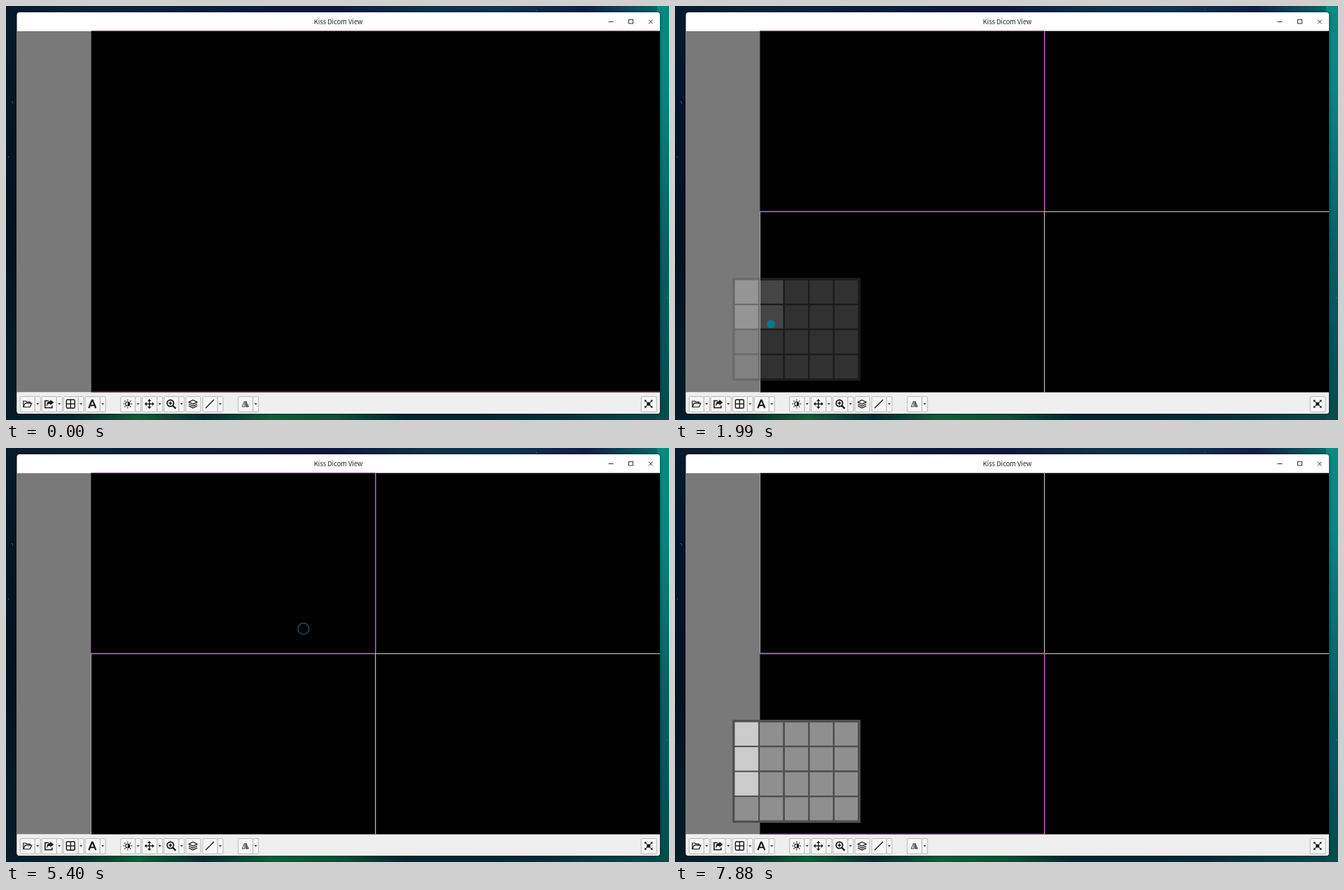
Recreate the animation shown at these times as an HTML page with a canvas. Size 947x591 px, loop 8 s.

```html
<!DOCTYPE html>
<html lang="en">
<head>
<meta charset="utf-8">
<title>Kiss Dicom View</title>
<style>
  html, body { margin: 0; width: 100%; height: 100%; overflow: hidden; background: #061826; }
  canvas { display: block; }
</style>
</head>
<body>
<canvas id="stage" width="947" height="591"></canvas>
<script>
const W = 947, H = 591, LOOP = 8000;
const stage = document.getElementById('stage');
const view = stage.getContext('2d');
const INK = '#161616', TEAL = '#06798d';
const AREA = { l: 121, t: 35, r: 934, b: 551.5 };
const MID = { x: 527, y: 293 };
let g = view;

function rect(x, y, w, h, fill) {
  g.fillStyle = fill;
  g.fillRect(x, y, w, h);
}

function poly(points, close) {
  g.beginPath();
  points.forEach(([x, y], i) => i ? g.lineTo(x, y) : g.moveTo(x, y));
  if (close) g.closePath();
}

function stroke(points, width = 1.3, close = false) {
  poly(points, close);
  g.lineWidth = width;
  g.stroke();
}

function fill(points) {
  poly(points, true);
  g.fill();
}

function circle(x, y, r) {
  g.beginPath();
  g.arc(x, y, r, 0, Math.PI * 2);
}

function strip(x, y, w, h, colors) {
  const grad = w > h ? g.createLinearGradient(x, 0, x + w, 0) : g.createLinearGradient(0, y, 0, y + h);
  colors.forEach((c, i) => grad.addColorStop(i / (colors.length - 1), c));
  rect(x, y, w, h, grad);
}

// Icons are drawn around 0,0
const icons = {
  folder() {
    stroke([[-5.5, 4.5], [-5.5, -4], [-2, -4], [-0.7, -2.6], [4, -2.6], [4, -0.8]], 1.2);
    stroke([[-5.5, 4.5], [-3, -0.8], [6.4, -0.8], [4, 4.5]], 1.2, true);
  },
  share() {
    stroke([[-0.5, -4.5], [-5.5, -4.5], [-5.5, 5.5], [4.5, 5.5], [4.5, 2.5]], 1.6);
    fill([[2, -6], [7, -2], [2, 2], [2, -0.2], [-1, 0.3], [-3.4, 3.4], [-2.6, -1.4], [-0.6, -3.6], [2, -3.9]]);
  },
  grid() {
    g.lineWidth = 1.4;
    g.beginPath();
    g.roundRect(-6, -6, 12, 12, 1.5);
    g.stroke();
    stroke([[0, -6], [0, 6]], 1.4);
    stroke([[-6, 0], [6, 0]], 1.4);
  },
  letter() {
    stroke([[-5, 6], [-0.5, -5.2], [0.5, -5.2], [5, 6]], 2.2);
    stroke([[-3, 2.2], [3, 2.2]], 1.9);
  },
  light() {
    circle(0, 0, 3);
    g.lineWidth = 1.1;
    g.stroke();
    g.beginPath();
    g.arc(0, 0, 3, -Math.PI / 2, Math.PI / 2);
    g.fill();
    for (let i = 0; i < 8; i++) {
      const c = Math.cos(i * Math.PI / 4), s = Math.sin(i * Math.PI / 4);
      stroke([[c * 4.7, s * 4.7], [c * 6.3, s * 6.3]], 1.2);
    }
  },
  move() {
    stroke([[-5, 0], [5, 0]], 1.4);
    stroke([[0, -5], [0, 5]], 1.4);
    turns(0, () => fill([[0, -7], [2.7, -4], [-2.7, -4]]));
  },
  zoom() {
    circle(-1, -1, 4.7);
    g.lineWidth = 1.7;
    g.stroke();
    stroke([[2.6, 2.6], [6.6, 6.6]], 2.2);
    stroke([[-3.4, -1], [1.4, -1]], 1.5);
    stroke([[-1, -3.4], [-1, 1.4]], 1.5);
  },
  layers() {
    stroke([[0, -5.5], [6, -2.6], [0, 0.3], [-6, -2.6]], 1.2, true);
    stroke([[-6, 0.2], [0, 3.1], [6, 0.2]], 1.2);
    stroke([[-6, 2.9], [0, 5.8], [6, 2.9]], 1.2);
  },
  line() {
    stroke([[-6, 6], [6, -6]], 1.3);
  },
  flip() {
    stroke([[-0.9, -4], [-0.9, 4], [-4.6, 4]], 0.8, true);
    g.fillStyle = '#888';
    fill([[0.9, -4], [0.9, 4], [4.6, 4]]);
    stroke([[0.9, -4], [0.9, 4], [4.6, 4]], 0.8, true);
  },
  expand() {
    circle(0, 0, 2.6);
    g.fill();
    turns(Math.PI / 4, () => {
      stroke([[0, -2], [0, -6]], 1);
      fill([[0, -8.3], [2, -5.6], [-2, -5.6]]);
    });
  }
};

function turns(start, draw) {
  for (let i = 0; i < 4; i++) {
    g.save();
    g.rotate(start + i * Math.PI / 2);
    draw();
    g.restore();
  }
}

function box(x, w) {
  g.beginPath();
  g.roundRect(x + 0.5, 557.5, w - 1, 22, 1.5);
  g.fillStyle = '#f6f6f6';
  g.fill();
  g.strokeStyle = '#b9b9b9';
  g.lineWidth = 1;
  g.stroke();
}

function button(x, name, menu = true, w = 22) {
  if (menu) {
    box(x + 21, 9);
    g.fillStyle = '#444';
    fill([[x + 23.4, 567], [x + 27.6, 567], [x + 25.5, 569.4]]);
  }
  box(x, w);
  g.save();
  g.translate(x + w / 2 - 0.4, 568);
  g.fillStyle = g.strokeStyle = INK;
  icons[name]();
  g.restore();
}

function wallpaper() {
  rect(0, 0, W, H, '#061826');
  strip(0, 0, W, 12, ['#071b2d', '#08243a', '#0a1f3c', '#0b1a3d', '#0f173f', '#0b3149', '#0b3553', '#101d48', '#08716d']);
  strip(0, 578, W, 13, ['#041c28', '#06282d', '#096039', '#062b31', '#09603a', '#085336', '#06262f', '#062530', '#062c34', '#073d41', '#084b49']);
  strip(0, 0, 18, H, ['#071b2d', '#04142a', '#031225', '#04111e', '#041925', '#041c28']);
  strip(930, 0, 17, H, ['#0b8a80', '#0a8580', '#097270', '#086062', '#07545a', '#084b49']);
  for (const [x, y] of [[8, 136], [9, 138], [3, 215], [15, 494], [354, 9], [757, 6], [944, 416]]) rect(x, y, 1, 1, '#6d8aa0');
}

function frame() {
  g.save();
  g.shadowColor = 'rgba(0,0,0,.45)';
  g.shadowBlur = 5;
  g.beginPath();
  g.roundRect(15.5, 9, 918.5, 573, 4);
  g.fillStyle = '#fff';
  g.fill();
  g.restore();

  g.fillStyle = '#222';
  g.font = '9.3px "Noto Sans CJK SC", "Noto Sans", sans-serif';
  g.textAlign = 'center';
  g.textBaseline = 'alphabetic';
  g.fillText('Kiss Dicom View', 474.7, 26.2);

  g.strokeStyle = '#333';
  stroke([[860.5, 22.5], [867.5, 22.5]], 1);
  g.strokeRect(889.5, 19.5, 6, 5.5);
  stroke([[918, 19.7], [923.6, 25.3]], 1);
  stroke([[923.6, 19.7], [918, 25.3]], 1);

  rect(15.5, 36, 106, 515.5, '#797979');
  g.beginPath();
  g.roundRect(15.5, 551.5, 918.5, 30.5, [0, 0, 4, 4]);
  g.fillStyle = '#efefef';
  g.fill();

  ['folder', 'share', 'grid', 'letter'].forEach((n, i) => button(19.7 + 31 * i, n));
  ['light', 'move', 'zoom'].forEach((n, i) => button(163.2 + 31 * i, n));
  button(256.5, 'layers', false);
  button(280.5, 'line');
  button(331.2, 'flip');
  button(906.7, 'expand', false, 23);
}

const backdrop = document.createElement('canvas');
backdrop.width = W;
backdrop.height = H;
g = backdrop.getContext('2d');
wallpaper();
frame();
g = view;

// Pane numbers: 0 top left, 1 top right, 2 bottom left, 3 bottom right
const clicks = [
  { down: 1060, up: 1110, x: 93, y: 568 },
  { down: 1940, up: 2010, x: 137, y: 454, pane: 0 },
  { down: 2600, up: 2680, x: 622, y: 236, pane: 1 },
  { down: 3250, up: 3340, x: 612, y: 372, pane: 3 },
  { down: 3860, up: 3930, x: 455, y: 379, pane: 2 },
  { down: 4390, up: 4470, x: 600, y: 240, pane: 1 },
  { down: 4760, up: 4840, x: 606, y: 362, pane: 3 },
  { down: 5110, up: 5210, x: 425, y: 258, pane: 0 },
  { down: 5470, up: 5550, x: 604, y: 360, pane: 3 },
  { down: 5800, up: 5880, x: 598, y: 242, pane: 1 },
  { down: 6130, up: 6355, x: 394, y: 357, pane: 2 },
  { down: 7370, up: 7430, x: 93, y: 568 }
];
const SPLIT = 1940, RING = 360;

function panes(t) {
  const { l, t: top, r, b } = AREA;
  rect(l + 0.5, top + 0.7, r - l - 0.5, b - top - 0.7, '#000');
  if (t < SPLIT) {
    rect(l + 1, 35.6, r - l - 1, 0.9, '#4c0d4c');
    rect(l + 1, 550, r - l - 1, 1, '#571457');
    return;
  }
  const active = clicks.filter(c => c.pane !== undefined && c.down <= t).pop().pane;
  const col = active % 2, row = active >> 1;
  const GREY = '#b6b6b6', PINK = '#b45fba';

  rect(l, 36, 1, MID.y - 36, '#a2a2a2');
  rect(l, MID.y, 1, b - MID.y, '#a2a2a2');
  rect(MID.x, 36, 1.3, b - 36, GREY);
  rect(l, MID.y, r - l, 1.2, GREY);

  const x = col ? MID.x : l, y = row ? MID.y : 36;
  const w = col ? r - MID.x : MID.x - l, h = row ? b - MID.y : MID.y - 36;
  if (!col) rect(l, y, 1, h, '#3a2a3a');
  rect(MID.x, y, 1.3, h, PINK);
  if (row) {
    rect(x, MID.y - 0.4, w, 0.7, '#8fb08f');
    rect(x, MID.y + 0.2, w, 0.9, PINK);
    rect(x, 550, w, 1, '#571457');
  } else {
    rect(x, MID.y - 0.3, w, 1, PINK);
    rect(x, 35.6, w, 0.9, '#4c0d4c');
  }
}

const clamp = v => Math.max(0, Math.min(1, v));

function popup(t) {
  let alpha, cols = 1, rows = 4;
  if (t < 2040) {
    alpha = t < SPLIT ? clamp((t - 1110) / 140) : clamp((2042 - t) / 150);
    if (t >= 1490) rows = 3;
    if (t >= 1540) cols = 2;
    if (t >= 1740) rows = 2;
  } else {
    alpha = clamp((t - 7430) / 140);
    if (t >= 7870) rows = 3;
  }
  if (!alpha) return;
  const x0 = 82, y0 = 388, step = 35.6;
  const cells = [];
  for (let i = 0; i < 20; i++) cells.push([i % 5, Math.floor(i / 5)]);
  g.globalAlpha = alpha;
  g.beginPath();
  g.rect(x0, y0, 183, 147);
  cells.forEach(([c, r]) => g.rect(x0 + 3.5 + c * step, y0 + 3.5 + r * step, 33.4, 33.4));
  g.fillStyle = '#505050';
  g.fill('evenodd');
  for (const [c, r] of cells) {
    rect(x0 + 3.5 + c * step, y0 + 3.5 + r * step, 33.4, 33.4, c < cols && r < rows ? '#cbcbcb' : '#8f8f8f');
  }
  g.globalAlpha = 1;
}

// A disc grows on press, then opens into a thinning ring on release
function ripple(t, c) {
  if (t < c.down || t >= c.up + RING) return;
  if (t < c.up) {
    circle(c.x, c.y, 6 * clamp((t - c.down + 15) / 60));
    g.fillStyle = TEAL;
    g.fill();
    return;
  }
  const left = Math.pow(1 - (t - c.up) / RING, 2.3);
  const outer = 9 - 3 * left, width = 6 * left;
  circle(c.x, c.y, outer - width / 2);
  g.lineWidth = width;
  g.strokeStyle = TEAL;
  g.stroke();
}

function draw(now) {
  const t = now % LOOP;
  g.drawImage(backdrop, 0, 0);
  panes(t);
  popup(t);
  clicks.forEach(c => ripple(t, c));
}

const start = performance.now();
function tick() {
  draw(performance.now() - start);
  requestAnimationFrame(tick);
}
tick();
</script>
</body>
</html>
```
